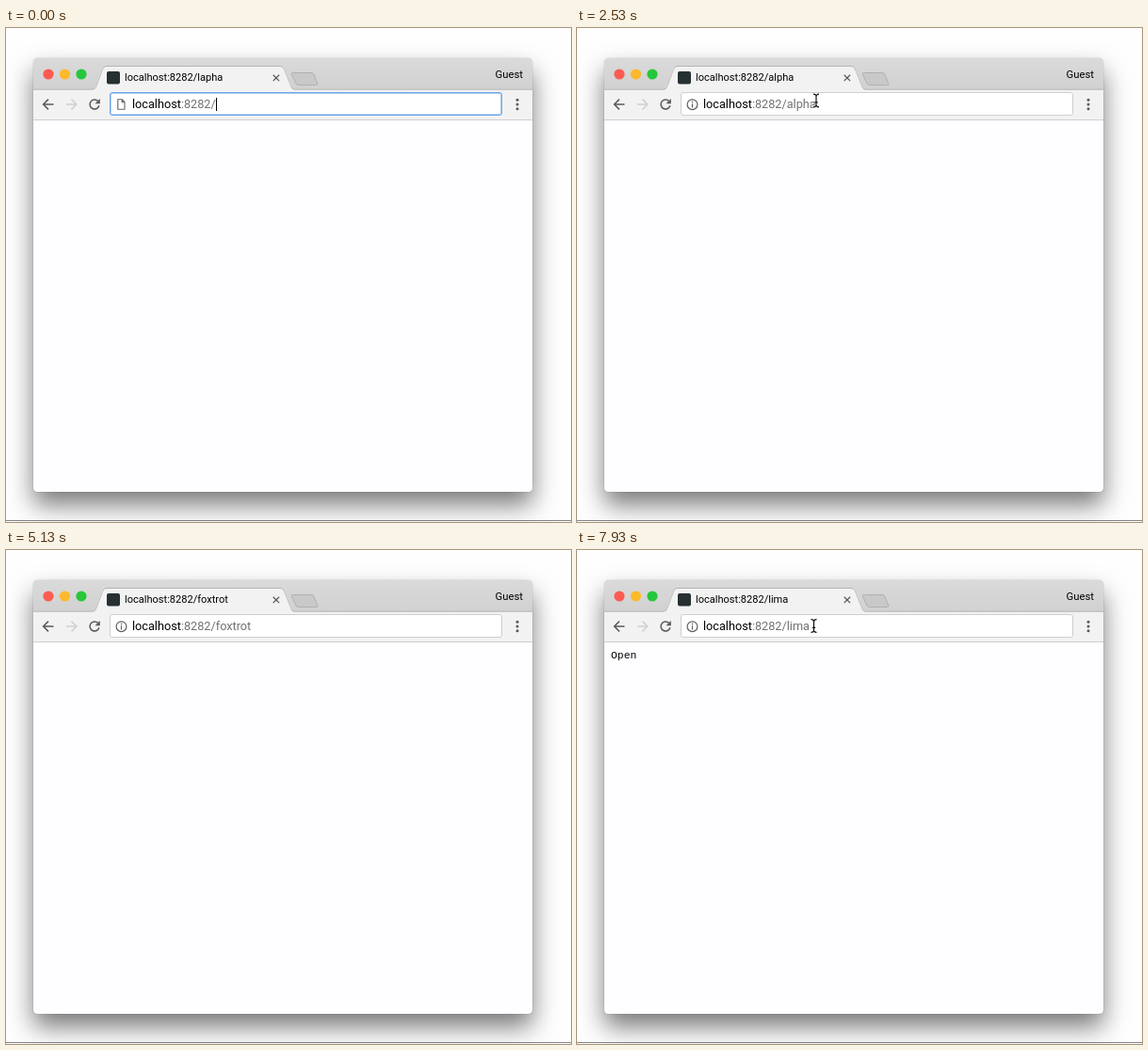
Recreate the animation shown at these times as an HTML page. Size 600 by 524 pixels, loop 8000 ms.

```html
<!DOCTYPE html>
<html lang="en">
<head>
<meta charset="utf-8">
<title>Browser typing</title>
<style>
  html, body { margin: 0; width: 100%; height: 100%; overflow: hidden; background: #fefefe; }
  #stage { position: relative; width: 600px; height: 524px; overflow: hidden; font: 12.7px/20px Roboto, sans-serif; color: #000; }
  #stage div, svg { position: absolute; white-space: pre; }
  #edge { left: 0; top: 522px; width: 600px; height: 1px; background: #858585; }
  #window {
    left: 29px; top: 32px; width: 530px; height: 460px; border-radius: 5px 5px 4px 4px; background: #fefdff;
    box-shadow: 0 0 1px rgba(0,0,0,.5), 0 14px 27px rgba(0,0,0,.52);
  }
  #strip { left: 29px; top: 32px; width: 530px; height: 33px; border-radius: 5px 5px 0 0; background: linear-gradient(#dadada, #d1d1d1); }
  #bar { left: 29px; top: 65px; width: 530px; height: 32px; background: #f2f2f2; border-bottom: 1px solid #cfcfcf; box-sizing: border-box; height: 33px; }
  #box { left: 110px; top: 68px; width: 417px; height: 25px; box-sizing: border-box; border: 1px solid #cfcfcf; border-radius: 3px; background: #fff; }
  #box.focus { border-color: #68a4e8; box-shadow: inset 0 0 0 .5px #68a4e8; }
  #title, #guest { font-size: 11.05px; }
  #title { left: 126px; top: 43px; }
  #guest { left: 519.5px; top: 40px; font-size: 11.3px; }
  #url { left: 134px; top: 71px; color: #707070; }
  #url span { padding: 1px 0 0; }
  #host { color: #000; }
  .sel { background: #9ccafb; }
  #caret { display: inline-block; width: 1px; height: 14px; margin-right: -1px; vertical-align: -3px; background: #000; }
  #drop { left: 29px; top: 98px; width: 530px; height: 51px; background: #fff; box-shadow: 0 1px 3px rgba(0,0,0,.3); clip-path: inset(0 0 -8px 0); }
  #pick { left: 0; top: 3px; width: 530px; height: 22px; background: #e6e6e6; }
  #hit { left: 105px; top: 4px; font-size: 13.6px; font-weight: 700; color: #1558d0; }
  #ask { left: 105px; top: 26px; color: #555; }
  #ask span { color: #000; }
  #body { left: 36px; top: 102px; font: 11.45px/20px "Liberation Mono", monospace; }
</style>
</head>
<body>
<div id="stage">
  <div id="edge"></div>
  <div id="window"></div>
  <div id="strip"></div>
  <div id="bar"></div>
  <div id="box"></div>
  <div id="body">Open</div>
  <div id="drop">
    <div id="pick"></div>
    <div id="hit"></div>
    <div id="ask"><span id="query"></span> – Orvane Search</div>
  </div>

  <svg width="600" height="524" viewBox="0 0 600 524" fill="none">
    <defs>
      <g id="page" stroke="#666" stroke-width="1.1">
        <path d="M-3.6-5.2H1L3.6-2.4V5.2H-3.6ZM.8-5V-2.2H3.5"/>
      </g>
    </defs>
    <circle cx="45" cy="49" r="5.6" fill="#fc5b51"/>
    <circle cx="62.5" cy="49" r="5.6" fill="#fdb92c"/>
    <circle cx="80" cy="49" r="5.6" fill="#27c73c"/>
    <path d="M29 65.2H92.5C95.5 64.5 96 62.5 97 60L103 43.5Q104.200 40.500 107 40.500H291Q293.800 40.500 295 43.500L301.500 60C302.500 62.500 303 64.500 306 65.200H559" stroke="#b3b3b3"/>
    <path d="M92.500 66C95.500 65 96 62.500 97 60L103 43.800Q104.200 41 107 41H291Q293.800 41 295 43.800L301.500 60C302.500 62.500 303 65 306 66Z" fill="#f2f2f2"/>
    <path d="M304.500 47.500H324Q326 47.500 326.800 49L330.800 59Q331.300 60.500 329.500 60.500H311Q309 60.500 308 59L303.300 49Q302.800 47.500 304.500 47.500Z" fill="#c9c9c9" stroke="#b0b0b0"/>
    <path d="M283.700 49.700L290.100 56.100M290.100 49.700L283.700 56.100" stroke="#5a5a5a" stroke-width="1.3"/>
    <rect id="favicon" x="107" y="46" width="14" height="13.500" rx="2" fill="#263032"/>
    <circle id="spinner" cx="114" cy="52.600" r="6.200" pathLength="100" transform="rotate(-94 114 52.600)" stroke="#3b86e8" stroke-width="1.800"/>

    <g stroke-width="1.500">
      <path d="M50.500 81H39.800M45 75.600L39.600 81L45 86.400" stroke="#5a5a5a"/>
      <path d="M64 81H74.700M69.500 75.600L74.900 81L69.500 86.400" stroke="#d0d0d0"/>
      <g id="reload">
        <path d="M97.600 77.400A5 5 0 1 0 98.900 82.300" stroke="#5a5a5a"/>
        <path d="M99.800 75V80.200H94.600Z" fill="#5a5a5a"/>
      </g>
      <path id="stop" d="M89.300 76.300L98.700 85.700M98.700 76.300L89.300 85.700" stroke="#5a5a5a"/>
    </g>
    <g fill="#5a5a5a">
      <circle cx="543" cy="76.300" r="1.500"/><circle cx="543" cy="81" r="1.500"/><circle cx="543" cy="85.700" r="1.500"/>
    </g>

    <use id="doc" href="#page" x="122.400" y="81"/>
    <g id="info" stroke="#5f5f5f" stroke-width="1.200">
      <circle cx="122.500" cy="81.200" r="5.400"/>
      <path d="M122.500 80.200V84.400M122.500 77.800V79.200"/>
    </g>
    <g id="dropIcons">
      <use href="#page" x="122.400" y="112.500"/>
      <g stroke="#666" stroke-width="1.300">
        <circle cx="121" cy="133" r="3.400"/><path d="M123.500 135.500L127.500 139.500"/>
      </g>
    </g>
  </svg>

  <div id="title"></div>
  <div id="guest">Guest</div>
  <div id="url"><span id="all"><span id="host">localhost</span>:8282/<span id="path"></span></span><i id="caret"></i></div>

  <svg width="600" height="524" viewBox="0 0 600 524" fill="none">
    <g id="pointer">
      <path id="beam" d="M-3-6.800Q0-6.800 0-4.500Q0-6.800 3-6.800M0-5V5M-3 6.800Q0 6.800 0 4.500Q0 6.800 3 6.800M-1.700 1.800H1.700" stroke="#fff" stroke-width="2.600" opacity=".8"/>
      <use href="#beam" style="display:none"/>
      <path d="M-3-6.800Q0-6.800 0-4.500Q0-6.800 3-6.800M0-5V5M-3 6.800Q0 6.800 0 4.500Q0 6.800 3 6.800M-1.700 1.800H1.700" stroke="#111" stroke-width="1.200"/>
    </g>
  </svg>
</div>
<script>
const LOOP = 8000;
const $ = id => document.getElementById(id);
const show = (id, on) => { $(id).style.display = on ? '' : 'none'; };

const type = (word, times) => times.map((at, i) =>
  [at, { path: word.slice(0, i + 1), focus: true, doc: true, drop: true, sel: '', caret: true }]);
const enter = { focus: false, doc: false, drop: false, caret: false, stop: true, arc: 3 };
const selectAll = { focus: true, sel: 'all' };
const selectWord = { sel: 'path' };

// Each step changes part of the state at a given time.
const steps = [
  [0, { path: '', title: 'lapha', focus: true, doc: true, caret: true, drop: false, sel: '', stop: false, arc: 0, open: false }],
  [400, { caret: false }],
  ...type('alpha', [870, 1000, 1130, 1270, 1400]),
  [1530, enter],
  [1600, { arc: 14 }],
  [1730, { title: 'alpha' }],
  [1800, { arc: 0 }],
  [2000, { stop: false }],
  [2800, selectAll],
  [2930, selectWord],
  ...type('foxtrot', [3330, 3470, 3600, 3930, 4130, 4330, 4530]),
  [4930, enter],
  [5000, { arc: 14 }],
  [5070, { title: 'foxtrot' }],
  [5130, { arc: 0, stop: false }],
  [5800, selectAll],
  [5930, selectWord],
  ...type('lima', [6530, 6670, 6800, 6930]),
  [7130, enter],
  [7200, { arc: 14, open: true }],
  [7330, { stop: false }],
  [7470, { title: 'lima' }],
  [7530, { arc: 0 }]
];

// Pointer runs: time, x, y. Hidden outside each run.
const runs = [
  [[2000, 252, 84], [2530, 254, 77], [2670, 254, 77], [2800, 254, 80], [3330, 254, 80]],
  [[5470, 252, 80], [5530, 254, 80], [6530, 254, 80]],
  [[7930, 251.5, 80.5], [8000, 251.5, 80.5]]
];

function pointerAt(t) {
  const run = runs.find(r => t >= r[0][0] && t < r[r.length - 1][0]);
  if (!run) return null;
  const i = run.findIndex(k => k[0] > t);
  const [a, b] = [run[i - 1], run[i]];
  const p = (t - a[0]) / (b[0] - a[0]);
  const k = p * p * (3 - 2 * p);
  return [a[1] + (b[1] - a[1]) * k, a[2] + (b[2] - a[2]) * k];
}

function render(t) {
  const s = {};
  for (const [at, change] of steps) if (at <= t) Object.assign(s, change);

  const address = 'localhost:8282/' + s.path;
  $('title').textContent = 'localhost:8282/' + s.title;
  $('path').textContent = s.path;
  $('hit').textContent = address;
  $('query').textContent = address;

  $('box').className = s.focus ? 'focus' : '';
  $('all').className = s.sel === 'all' ? 'sel' : '';
  $('path').className = s.sel === 'path' ? 'sel' : '';
  show('caret', s.caret);
  show('doc', s.doc);
  show('info', !s.doc);
  show('drop', s.drop);
  show('dropIcons', s.drop);
  show('body', s.open);
  show('stop', s.stop);
  show('reload', !s.stop);
  show('favicon', !s.arc);
  show('spinner', s.arc);
  $('spinner').setAttribute('stroke-dasharray', s.arc + ' 100');

  const pos = pointerAt(t);
  show('pointer', pos);
  if (pos) $('pointer').setAttribute('transform', `translate(${pos})`);
}

function tick() {
  render(performance.now() % LOOP);
  requestAnimationFrame(tick);
}
tick();
</script>
</body>
</html>
```
